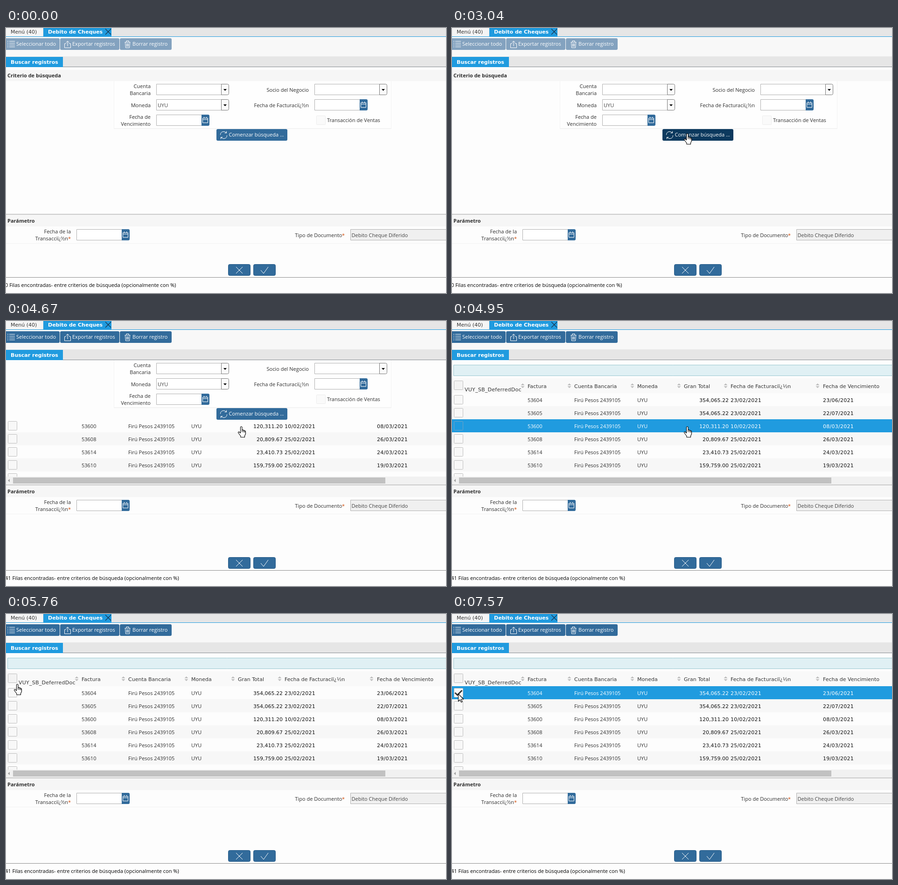
Animation, 943 px wide and 569 px high, one loop 8 s. Source, as an HTML page with a canvas:

```html
<!DOCTYPE html>
<html lang="es">
<head>
<meta charset="utf-8">
<title>Debito de Cheques</title>
<style>
html, body { margin: 0; width: 100%; height: 100%; overflow: hidden; background: #fdfdfd; }
canvas { display: block; }
</style>
</head>
<body>
<canvas id="stage" width="943" height="569"></canvas>
<script>
const c = document.getElementById('stage').getContext('2d');
const W = 943, H = 569, LOOP = 8000;
const SANS = '11px "Open Sans", sans-serif';
const BOLD = 'bold 11px "Open Sans", sans-serif';
const WIDE = '11px "DejaVu Sans", sans-serif';
const WIDE_BOLD = 'bold 11px "DejaVu Sans", sans-serif';
const BLUE = '#209bdf', STEEL = '#326b9b', STEEL_OFF = '#83a2bf', STEEL_HOVER = '#0c395e';
const PAGE = '#fdfdfd', BAND = '#f6f6f6', INK = '#2e2e2e';

// Start time, x, y and shape of the pointer
const POINTER = [
  [520, 917, 551, 'arrow'], [590, 655, 390, 'arrow'], [660, 485, 268, 'arrow'],
  [1920, 485, 267, 'arrow'], [1990, 486, 262, 'arrow'], [2060, 490, 251, 'arrow'],
  [2130, 495, 238, 'hand'], [2250, 500, 230, 'hand'], [2320, 502, 226, 'hand'],
  [5480, 420, 212, 'hand'], [5550, 250, 176, 'hand'], [5620, 110, 147, 'hand'],
  [5690, 45, 138, 'hand'], [5760, 22, 150, 'hand'],
  [6360, 21, 153, 'hand'], [6430, 18, 159, 'arrow'], [6500, 16, 164, 'arrow'],
  [6570, 14, 168, 'arrow'], [6640, 13, 171, 'arrow']
];
const CLICKS = [[2850, 3040], [7450, 7570]];
const FOUND = 4480, COLLAPSED = 4950, CHECKED = 7570;

const ROWS = [
  ['53604', '354,065.22', '23/02/2021', '23/06/2021'],
  ['53605', '354,065.22', '23/02/2021', '22/07/2021'],
  ['53600', '120,311.20', '10/02/2021', '08/03/2021'],
  ['53608', '20,809.67', '25/02/2021', '26/03/2021'],
  ['53614', '23,410.73', '25/02/2021', '24/03/2021'],
  ['53610', '159,759.00', '25/02/2021', '19/03/2021'],
  ['53611', '48,120.00', '25/02/2021', '12/03/2021']
];
const HEADS = [
  [162, 'Factura'], [262, 'Cuenta Bancaria'], [397, 'Moneda'],
  [497, 'Gran Total'], [597, 'Fecha de Facturaciï¿½n'], [795, 'Fecha de Vencimiento']
];

function rect(x, y, w, h, fill) {
  c.fillStyle = fill;
  c.fillRect(x, y, w, h);
}

function box(x, y, w, h, fill, border, r = 0) {
  c.beginPath();
  c.roundRect(x + .5, y + .5, w - 1, h - 1, r);
  c.fillStyle = fill;
  c.fill();
  c.lineWidth = 1;
  c.strokeStyle = border;
  c.stroke();
}

function text(s, x, y, font = SANS, color = INK, align = 'left', spacing = 0) {
  c.font = font;
  c.fillStyle = color;
  c.textAlign = align;
  c.letterSpacing = spacing + 'px';
  c.fillText(s, x, y);
}

const label = (s, x, y) => text(s, x, y, SANS, INK, 'right');

function stroke(d, x, y, color = '#fff', width = 1) {
  c.save();
  c.translate(x, y);
  c.strokeStyle = color;
  c.lineWidth = width;
  c.stroke(new Path2D(d));
  c.restore();
}

function triangle(x, y, w, h, color) {
  c.beginPath();
  c.moveTo(x - w / 2, y);
  c.lineTo(x + w / 2, y);
  c.lineTo(x, y + h);
  c.fillStyle = color;
  c.fill();
}

function button(x, y, w, h, color) {
  c.beginPath();
  c.roundRect(x, y, w, h, 3);
  c.fillStyle = color;
  c.fill();
}

function combo(x, y, value) {
  box(x, y, 140, 24, '#fff', '#b0b0b0');
  box(x + 139, y, 17, 24, '#fbfbfb', '#777', [0, 3, 3, 0]);
  triangle(x + 147.5, y + 11, 7, 4, '#000');
  if (value) text(value, x + 3, y + 17, SANS, '#444');
}

function dateField(x, y) {
  box(x, y, 98, 24, '#fff', '#b0b0b0');
  c.beginPath();
  c.roundRect(x + 97, y, 17, 24, [0, 3, 3, 0]);
  c.fillStyle = STEEL;
  c.fill();
  stroke('M0.5 2.5H11.5V12.5H0.5ZM0.5 5.5H11.5M3.5 0V3M8.5 0V3', x + 99, y + 5);
}

function tickBox(x, y, fill = '#f8f8f8', border = '#bdbdbd') {
  box(x, y, 20, 20, fill, border, 1);
}

function drawTop(active) {
  rect(0, 0, W, 18, '#e6e6e6');
  rect(0, 0, 79, 18, '#f5f5f5');
  rect(80, 0, 146, 18, BLUE);
  rect(0, 18, W, 1, BLUE);
  text('Menú (40)', 10, 12, WIDE, '#333');
  text('Debito de Cheques', 90, 12, WIDE_BOLD, '#fff');
  stroke('M0 0L12 12M12 0L0 12', 213, 2, '#17324a', 1.2);

  rect(0, 19, W, 42, '#f8f8f8');
  const color = active ? STEEL : STEEL_OFF;
  button(-3, 22, 118, 25, color);
  button(116, 22, 127, 25, color);
  button(244, 22, 111, 25, color);
  stroke('M0 .5H2M4 .5H16M0 4.5H2M4 4.5H16M0 8.5H2M4 8.5H16M0 12.5H2M4 12.5H16', 3, 28);
  stroke('M4 6.5H.5V15.5H13.5V6.5H10M7 12V1M3.5 4.5L7 1L10.5 4.5', 125, 27);
  stroke('M.5 3.5H12.5M4 3V.5H9V3M1.5 4L2.5 15.5H10.5L11.5 4M4.5 6V13M6.5 6V13M8.5 6V13', 254, 27);
  text('Seleccionar todo', 22, 38, SANS, '#fff');
  text('Exportar registros', 142, 38, SANS, '#fff');
  text('Borrar registro', 271, 38, SANS, '#fff');

  rect(0, 61, W, 22, '#e6e6e6');
  rect(0, 83, W, 1, '#858b90');
  rect(0, 62, 122, 22, BLUE);
  text('Buscar registros', 10, 77, WIDE_BOLD, '#fff');
}

function drawSearch(hover) {
  rect(0, 84, W, 158, PAGE);
  rect(0, 90, W, 24, BAND);
  text('Criterio de búsqueda', 3, 106, BOLD);
  rect(231, 114, 595, 103, '#f3f3f3');
  rect(232, 114, 593, 101, '#fefefe');

  label('Cuenta', 310, 129);
  label('Bancaria', 310, 144);
  combo(322, 120);
  label('Moneda', 310, 170);
  combo(322, 153, 'UYU');
  label('Fecha de', 310, 195);
  label('Vencimiento', 310, 210);
  dateField(322, 186);
  label('Socio del Negocio', 649, 137);
  combo(661, 120);
  label('Fecha de Facturaciï¿½n', 649, 170);
  dateField(661, 153);
  tickBox(665, 188, '#fafafa', '#ececec');
  text('Transacción de Ventas', 688, 202);

  button(451, 217, 152, 25, hover ? STEEL_HOVER : STEEL);
  stroke('M-7 0A7 7 0 0 1 5.5 -4.5M6 -8V-4H2M7 1A7 7 0 0 1 -5.5 5.5M-6 9V5H-2', 466.5, 229.5);
  text('Comenzar búsqueda ...', 477.5, 233, SANS, '#fff');
}

function drawRow(row, i, lit, checked) {
  const y = 155 + i * 28, base = y + 19;
  const ink = lit ? '#fff' : INK, dark = lit ? '#fff' : '#111';
  rect(0, y, W, 28, lit ? BLUE : i % 2 ? '#f7f7f7' : PAGE);
  if (lit && !checked) tickBox(4, y + 4, BLUE, '#6fa3c4');
  else tickBox(4, y + 4);
  if (checked) stroke('M0 5L5 10L15 0', 6.5, y + 9, '#333', 3);
  text(row[0], 162, base, SANS, ink);
  text('Firú Pesos 2439105', 262, base, SANS, ink);
  text('UYU', 397, base, SANS, ink);
  text(row[1], 593, base, WIDE, dark, 'right');
  text(row[2], 597, base, WIDE, dark, 'left', .25);
  text(row[3], 795, base, WIDE, dark, 'left', .25);
}

function drawTable(lit, checked) {
  rect(0, 84, W, 267, PAGE);
  box(3, 94, 950, 24, '#e0f0f4', '#9bc8d1');
  rect(0, 123, W, 32, '#f9f9f9');
  tickBox(4, 128, '#f3f3f3');
  text('VUY_SB_DeferredDoc', 27, 151, WIDE, '#333', 'left', .25);
  for (const [x, s] of HEADS) {
    text(s, x, 144, WIDE, '#333');
    const ax = x === 795 ? 783.5 : x - 10.5;
    triangle(ax, 138, 8, -4, '#bdbdbd');
    triangle(ax, 140, 8, 4, '#bdbdbd');
  }
  c.save();
  c.beginPath();
  c.rect(0, 155, W, 179);
  c.clip();
  ROWS.forEach((row, i) => drawRow(row, i, i === lit, checked && i === 0));
  c.restore();

  rect(0, 334, W, 17, '#f1f1f1');
  rect(15, 336, 798, 13, '#c1c1c1');
  c.beginPath();
  c.moveTo(8, 339);
  c.lineTo(4, 342.5);
  c.lineTo(8, 346);
  c.fillStyle = '#a3a3a3';
  c.fill();
}

function drawBottom(y, status) {
  rect(0, y, W, H - y, PAGE);
  rect(0, y - 1, W, 2, '#cbcbcb');
  rect(0, y + 1, W, 25, BAND);
  text('Parámetro', 3, y + 18, BOLD);
  label('Fecha de la', 139, y + 41);
  label('Transacciï¿½n', 133, y + 56);
  text('*', 133, y + 56, SANS, '#d2500f');
  dateField(151, y + 32);
  label('Tipo de Documento', 720.5, y + 49);
  text('*', 720, y + 49, SANS, '#d2500f');
  box(738, y + 32, 215, 24, '#f0f0f0', '#b0b0b0');
  text('Debito Cheque Diferido', 740.5, y + 49, SANS, '#444');
  rect(0, y + 62, W, 1, '#f3f3f3');

  for (const x of [476, 530]) box(x, 507, 48, 25, STEEL, '#255a87', 3);
  stroke('M0 0L14 14M14 0L0 14', 493, 513);
  stroke('M0 7L6 14L16 0', 546, 513);
  rect(0, 535, W, 1, '#8c8c8c');
  text(status + ' Filas encontradas- entre criterios de búsqueda (opcionalmente con %)', -2, 556, SANS, '#000');
}

const SHAPES = {
  arrow: 'M.5 .5V16.5L4.3 13L6.8 18.5L9.2 17.5L6.8 12H11.8Z',
  hand: 'M.5 2.5A1.75 1.75 0 0 1 4 2.5V8Q5.5 7 7 8.8Q8.8 8 9.7 10Q11.5 9.5 11.5 12V16.5L9.5 20.5V23.5H1V21L-4 14.5Q-5 11.5-2.5 12L.5 14.5Z'
};

function drawPointer([, x, y, kind]) {
  const shape = new Path2D(SHAPES[kind]);
  c.save();
  c.translate(x, y);
  c.fillStyle = '#fff';
  c.fill(shape);
  c.strokeStyle = '#000';
  c.lineWidth = 1.1;
  c.lineJoin = 'round';
  c.stroke(shape);
  if (kind === 'hand') c.stroke(new Path2D('M4 8V12.5M7 9V13M9.6 10V13.5'));
  c.restore();
}

function draw(t) {
  const pointer = POINTER.findLast(p => t >= p[0]);
  const found = t >= FOUND, collapsed = t >= COLLAPSED;
  rect(0, 0, W, H, PAGE);
  if (found) {
    const row = pointer[2] >= 155 ? Math.floor((pointer[2] - 155) / 28) : -1;
    drawTable(collapsed ? row : -1, t >= CHECKED);
  }
  if (!collapsed) {
    const step = found ? Math.floor((t - FOUND) / 67) / 7 : 0;
    const slide = 158 * (1 - Math.cos(Math.PI * step)) / 2;
    c.save();
    c.beginPath();
    c.rect(0, 84, W, 158);
    c.clip();
    c.translate(0, -Math.round(slide));
    drawSearch(!found && pointer && pointer[2] < 242);
    c.restore();
  }
  drawBottom(found ? 352 : 400, found ? '41' : '0');
  drawTop(found);
  if (!pointer) return;
  if (CLICKS.some(([a, b]) => t >= a && t < b)) {
    c.beginPath();
    c.arc(pointer[1], pointer[2], 12, 0, Math.PI * 2);
    c.fillStyle = 'rgba(255, 255, 0, .47)';
    c.fill();
  }
  drawPointer(pointer);
}

const start = performance.now();
function tick() {
  draw((performance.now() - start) % LOOP);
  requestAnimationFrame(tick);
}
tick();
</script>
</body>
</html>
```
